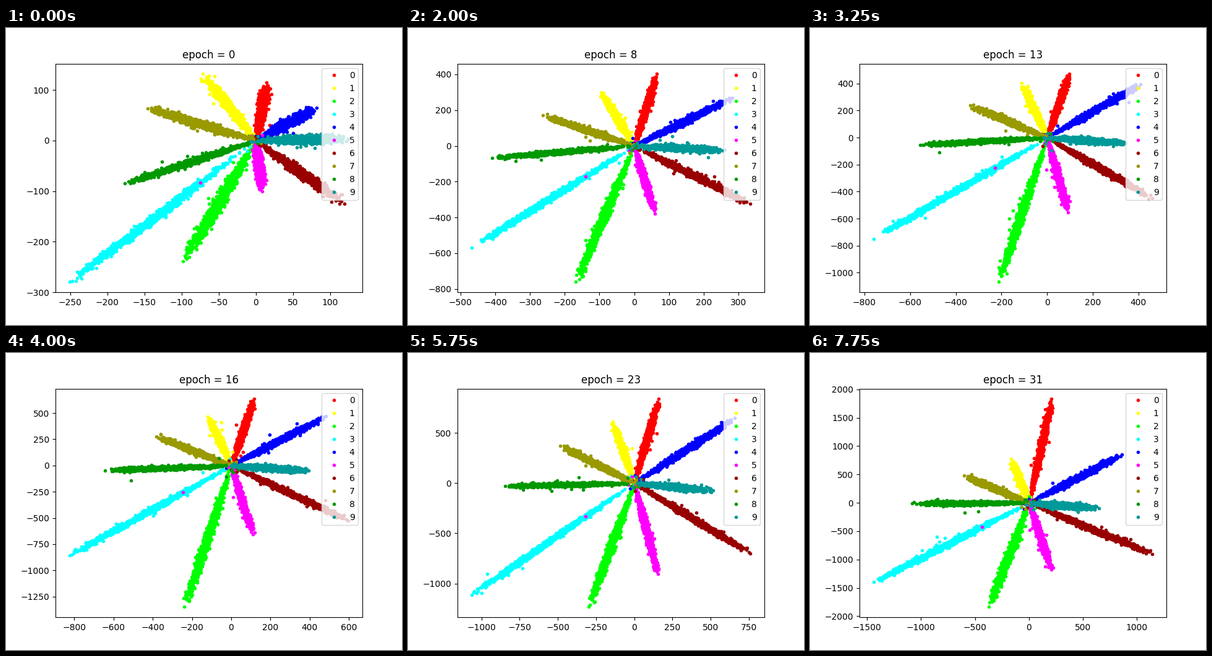
These frames come from a looping animation (640x480 px, 8 s). A matplotlib script:

```python
import numpy as np
import matplotlib.pyplot as plt
from matplotlib.animation import FuncAnimation

EPOCHS = 32
COUNT = 1000
AXES_PX = np.array([496, 369.6])

# Per class: colour, ray tip at the first and last epoch, spread in pixels
RAYS = [
    ("#ff0000", (14.5, 115), (210, 1830), 2.7),
    ("#ffff00", (-71.5, 131.5), (-165, 780), 2.6),
    ("#00ff00", (-98, -239), (-370, -1836), 3.4),
    ("#00ffff", (-251, -279.5), (-1440, -1400), 2.5),
    ("#0000ff", (82, 65), (860, 850), 2.7),
    ("#ff00ff", (8, -100), (205, -1180), 2.7),
    ("#990000", (119, -125), (1144, -900), 2.6),
    ("#999900", (-146, 64), (-600, 480), 2.5),
    ("#009900", (-176.5, -85), (-1080, -10), 1.9),
    ("#009999", (124.5, 3), (650, -100), 2.6),
]
START = np.array([ray[1] for ray in RAYS], float)
END = np.array([ray[2] for ray in RAYS], float)

# Uneven growth of the four rays that set the view: (class, axis) -> values
KEYS = [0, 8, 11, 16, 20, 26, 31]
EDGES = {
    (0, 1): [115, 402, 361.5, 633.6, 845.5, 827.7, 1830],
    (2, 1): [-239, -761, -882.8, -1348.7, -1026, -1438.7, -1836],
    (3, 0): [-251, -468.5, -718, -824.5, -1021, -1110, -1440],
    (6, 0): [119, 334.5, 370.5, 597.5, 647, 875, 1144],
}

fig, ax = plt.subplots(figsize=(6.4, 4.8), dpi=100)
lines = [ax.plot([], [], ".", color=ray[0], label=str(i))[0]
         for i, ray in enumerate(RAYS)]
ax.legend(loc="upper right")
title = ax.set_title("epoch = 0")


def tips_at(epoch):
    tips = START + (END - START) * epoch / (EPOCHS - 1)
    for place, values in EDGES.items():
        tips[place] = np.interp(epoch, KEYS, values)
    return tips


def ray_points(rng, tip, spread, scale):
    """Points along one ray; scale is pixels per data unit."""
    end = tip * scale
    length = np.hypot(*end)
    normal = np.array([-end[1], end[0]]) / length
    # Long rays are sparse near the origin
    t = 0.995 * rng.beta(2 + length / 400, 2.4, COUNT)
    side = rng.normal(0, spread, COUNT) * np.minimum(1, 0.3 + 2 * t)
    side[:8] = rng.normal(0, 7, 8)
    body = np.outer(t, end) + np.outer(side, normal)
    core = rng.normal(0, 6, (4, 2))
    return np.vstack([body, core, end]) / scale


def update(epoch):
    rng = np.random.default_rng(100 + epoch)
    tips = tips_at(epoch)
    low, high = tips.min(axis=0), tips.max(axis=0)
    pad = 0.05 * (high - low)
    low, high = low - pad, high + pad
    scale = AXES_PX / (high - low)
    tighten = 0.8 + 0.4 * np.exp(-epoch / 4)
    for label, line in enumerate(lines):
        points = ray_points(rng, tips[label], RAYS[label][3] * tighten, scale)
        if label == 5:  # one stray point lies on the ray of class 3
            points = np.vstack([points, 0.3 * tips[3]])
        line.set_data(points[:, 0], points[:, 1])
    ax.set_xlim(low[0], high[0])
    ax.set_ylim(low[1], high[1])
    title.set_text(f"epoch = {epoch}")
    return lines + [title]


anim = FuncAnimation(fig, update, frames=EPOCHS, interval=250,
                     init_func=lambda: lines, repeat=True, repeat_delay=0)
plt.show()
```
